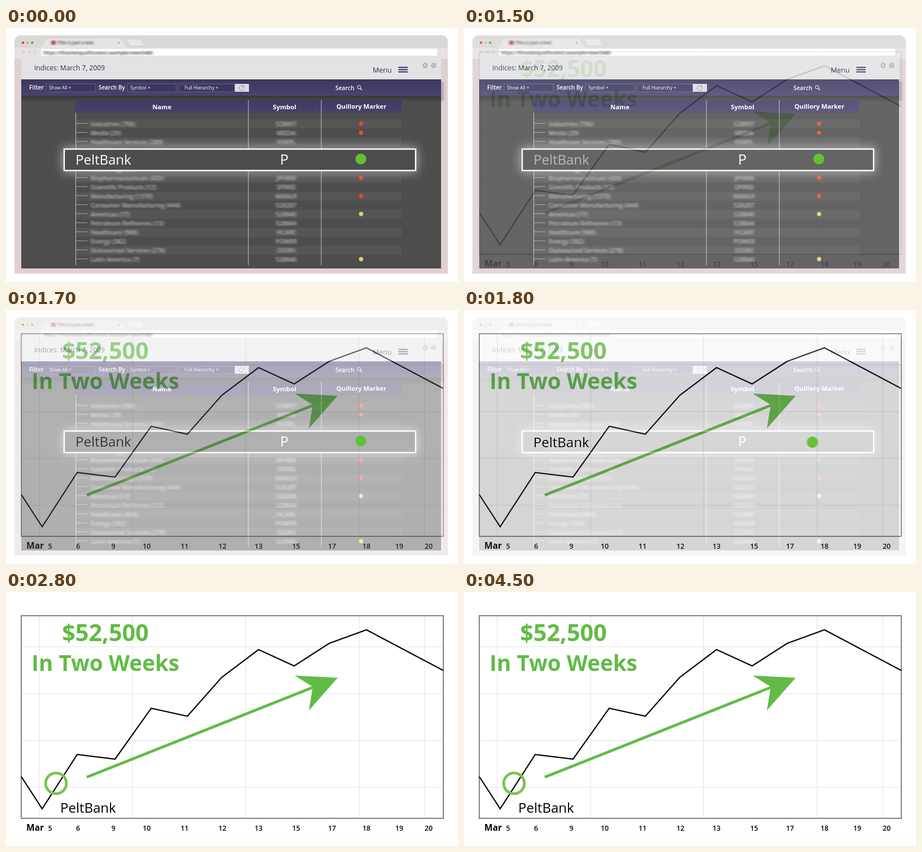
These frames come from a looping animation (800x450 px, 5100 ms). An HTML page:

```html
<!DOCTYPE html>
<html lang="en">
<head>
<meta charset="utf-8">
<title>Signal to chart</title>
<style>
html, body { margin: 0; width: 100%; height: 100%; overflow: hidden; background: #fff; }
svg { display: block; width: 100vw; height: 100vh; }
text { font-family: "Open Sans", "Noto Sans", sans-serif; }
</style>
</head>
<body>
<svg viewBox="0 0 800 450">
  <defs>
    <linearGradient id="bar" x2="0" y2="1">
      <stop offset="0" stop-color="#3b3762"/><stop offset="1" stop-color="#48446c"/>
    </linearGradient>
    <linearGradient id="head" x2="0" y2="1">
      <stop offset="0" stop-color="#3f3b66"/><stop offset="1" stop-color="#474269"/>
    </linearGradient>
    <linearGradient id="drop" x2="0" y2="1">
      <stop offset="0" stop-color="#000" stop-opacity=".28"/><stop offset="1" stop-color="#000" stop-opacity="0"/>
    </linearGradient>
    <filter id="smear" filterUnits="userSpaceOnUse" x="0" y="0" width="800" height="450">
      <feGaussianBlur stdDeviation="2 .9"/>
    </filter>
    <filter id="glow" filterUnits="userSpaceOnUse" x="0" y="0" width="800" height="450">
      <feGaussianBlur stdDeviation="9"/>
    </filter>
    <filter id="textBlur" filterUnits="userSpaceOnUse" x="0" y="0" width="800" height="450" color-interpolation-filters="sRGB">
      <feGaussianBlur stdDeviation="0"/>
    </filter>
    <filter id="dotBlur" filterUnits="userSpaceOnUse" x="0" y="0" width="800" height="450" color-interpolation-filters="sRGB">
      <feGaussianBlur stdDeviation="0"/>
    </filter>
    <clipPath id="frame"><rect x="15" y="13" width="767" height="422" rx="11"/><rect x="15" y="400" width="767" height="35"/></clipPath>
  </defs>
  <g id="chart"></g>
  <g id="browser" clip-path="url(#frame)"></g>
  <text id="label" font-size="24"></text>
  <circle id="dot"/>
</svg>
<script>
const LOOP = 5100, STEP = 100;
const BANK = "PeltBank", TICKER = "P", SIGNAL = "Quillory Marker";
const GREEN = "#62bb46";
const $ = id => document.getElementById(id);

function el(parent, tag, attrs, text) {
  const node = document.createElementNS("http://www.w3.org/2000/svg", tag);
  for (const key in attrs) node.setAttribute(key, attrs[key]);
  if (text) node.textContent = text;
  return parent.appendChild(node);
}
const rect = (g, x, y, width, height, fill, more) => el(g, "rect", { x, y, width, height, fill, ...more });
const path = (g, d, stroke, width = 1, more) =>
  el(g, "path", { d, stroke, "stroke-width": width, fill: "none", ...more });
const disc = (g, cx, cy, r, fill, more) => el(g, "circle", { cx, cy, r, fill, ...more });
const text = (g, str, x, y, size, fill, more) =>
  el(g, "text", { x, y, "font-size": size, fill, ...more }, str);
const mid = { "text-anchor": "middle" };
const semi = { "font-weight": 600 };
const bold = { "font-weight": 700 };

function drawChart(g) {
  for (const y of [97, 180, 263, 346]) path(g, `M27 ${y}H774`, "#ebebeb", 1.6);
  for (const x of [59, 224, 424, 625, 741]) path(g, `M${x} 42V401`, "#ebebeb", 1.6);
  rect(g, 27, 42, 747, 359, "none", { stroke: "#5a5a5a", "stroke-width": 1.5 });
  path(g, "M27 327L64 384L126 288L193 296L257 206L321 220L382 151L447 102L510 131L572 91L638 67L774 139", "#000", 2.2);
  path(g, "M143 328L548 167", GREEN, 5);
  el(g, "path", { d: "M587 152L511 148L543 168L536 210Z", fill: GREEN });
  text(g, "$52,500", 176, 87, 41.3, GREEN, { ...mid, ...bold });
  text(g, "In Two Weeks", 176, 140, 38.5, GREEN, { ...mid, ...bold });
  text(g, "Mar", 36, 423, 15.6, "#000", bold);
  const days = { 5: 78, 6: 127.5, 9: 190, 10: 249, 11: 316, 12: 383, 13: 447, 15: 513.5, 17: 577, 18: 638, 19: 696, 20: 748 };
  for (const day in days) text(g, day, days[day], 422.5, 12.4, "#000", { ...mid, ...semi });
}

function drawChrome(g) {
  rect(g, 15, 13, 767, 422, "#e0d0d0");
  rect(g, 15, 13, 767, 22, "#dad8d7");
  rect(g, 15, 35, 767, 20, "#e5e2e1");
  el(g, "path", { d: "M59 35Q64 34 67 27Q70 19 75 19H200Q205 19 208 27Q212 34 218 35Z", fill: "#e7e5e4" });
  el(g, "path", { d: "M213 20H236Q239 20 241 25Q243 31 246 31H223Q219 31 217 26Z", fill: "#e9e7e6" });
  ["#e0402f", "#e8b93a", "#4fb648"].forEach((c, i) => disc(g, 30 + i * 8.2, 26, 2.3, c));
  path(g, "M197.5 24L201 28M201 24L197.5 28", "#888", .8);
  path(g, "M34 43H28L31 40M28 43L31 46M38 43H44L41 40M44 43L41 46M54 40.5A3 3 0 1 0 55 44", "#c9c6c5", 1);
  rect(g, 62, 37, 701, 12, "#fff");
  for (const y of [40, 43, 46]) disc(g, 772, y, .8, "#fff");
  const soft = el(g, "g", { filter: "url(#smear)" });
  disc(soft, 84, 26, 4, "#a0483c");
  text(soft, "This is just a test", 91, 29, 8, "#4a4545", semi);
  text(soft, "https://thissiteisjustforatest.example/view/0480", 66, 46.5, 8.4, "#3c3838", semi);
}

function drawBars(g) {
  rect(g, 27, 54, 743, 38, "#e3e3e4");
  text(g, "Indices: March 7, 2009", 50, 75, 12.05, "#312d55");
  text(g, "Menu", 649, 78.5, 12.5, "#312d55");
  for (const y of [69.8, 73.8, 77.8]) path(g, `M694.5 ${y}H711`, "#332e62", 2);
  for (const x of [742, 757]) disc(g, x, 66.5, 3.8, "none", { stroke: "#77757c", "stroke-width": .9 });
  path(g, "M740.3 68L743.7 65M755.4 65L758.6 68.1M758.6 65L755.4 68.1", "#66646c", .9);

  rect(g, 766, 95, 9, 34, "#6a5a68", { opacity: .35, filter: "url(#smear)" });
  rect(g, 27, 120, 743, 306, "#4d4d4d");
  rect(g, 27, 120, 743, 12, "url(#drop)");
  rect(g, 27, 91, 743, 29, "url(#bar)");
  text(g, "Filter", 41, 109, 10.5, "#fff", semi);
  text(g, "Search By", 164, 109, 9.9, "#fff", semi);
  text(g, "Search", 583, 109.5, 10.3, "#fff", semi);
  for (const [x, w, tx, str] of [[71, 87, 76, "Show All +"], [215, 86, 220, "Symbol +"], [306, 99, 316, "Full Hierarchy +"]]) {
    rect(g, x, 99, w, 14, "#3b3761", { stroke: "#69658a", "stroke-width": .9 });
    text(g, str, tx, 109, 8.3, "#fff");
  }
  rect(g, 405, 99, 25, 14, "#dcdce2");
  path(g, "M420.6 104A4.3 4.3 0 1 0 421.3 107.4M421.3 101.5V104.5H418.3", "#8d8ba0", 1);
  disc(g, 624.8, 104.8, 3, "none", { stroke: "#fff", "stroke-width": 1 });
  path(g, "M627 107L630 110", "#fff", 1.2);
}

const rows = [
  ["Industries (706)", "528897"], ["Media (29)", "MEDIA"], ["Healthcare Services (289)", "HSRPL"],
  ["Multi-Retail Industries", ""], ["", ""], ["Technology (40)", ""],
  ["Biopharmaceuticals (420)", "JPHRM"], ["Scientific Products (12)", "SPRRD"], ["Manufacturing (1370)", "MANUF"],
  ["Consumer Manufacturing (444)", "526287"], ["Americas (17)", "528840"], ["Petroleum Refineries (13)", "528844"],
  ["Healthcare (988)", "HCARE"], ["Energy (382)", "POWER"], ["Outsourced Services (278)", "OSSRV"], ["Latin America (7)", "528846"]
];
const marks = { 0: "#df4a3a", 1: "#df4a3a", 6: "#df4a3a", 8: "#df4a3a", 10: "#e5d26a", 15: "#e5d26a" };

function drawTable(g) {
  rows.forEach((row, i) => { if (i % 2 === 0) rect(g, 123, 162 + 16 * i, 577, 16, "#555"); });
  rect(g, 123, 128, 577, 22.5, "url(#head)");
  text(g, "Name", 276, 144, 11.4, "#fff", { ...mid, ...bold });
  text(g, "Symbol", 493, 144, 11.3, "#fff", { ...mid, ...bold });
  text(g, SIGNAL, 629, 143, 11.2, "#fff", { ...mid, ...bold });
  path(g, "M123.5 150V420M429 128V420M558 128V420", "#c4c4c4", 1);
  const soft = el(g, "g", { filter: "url(#smear)" });
  rows.forEach(([name, symbol], i) => {
    const y = 170 + 16 * i;
    path(g, `M123 ${y - 1}H144`, "#a8a8a8", 1);
    text(soft, name, 150, y + 4, 10.6, "#bdbdbd", semi);
    text(soft, symbol, 496, y + 4, 10.6, "#bdbdbd", { ...mid, ...semi });
    if (marks[i]) {
      disc(g, 628.5, y - .5, 4.2, marks[i], { opacity: .45 });
      disc(g, 628.5, y - .5, 3.4, marks[i]);
    }
  });
  rect(g, 100, 211, 628, 45, "#fff", { opacity: .48, filter: "url(#glow)" });
  rect(g, 103, 214.5, 622, 38, "#4d4d4d", { stroke: "#fff", "stroke-width": 2.4 });
  text(g, BANK, 123, 242, 24, "#fff");
  text(g, TICKER, 492.5, 242, 25, "#fff", mid);
}

const unit = (t, a, b) => Math.min(1, Math.max(0, (t - a) / (b - a)));
const ease = u => u * u * (3 - 2 * u);
const speed = u => 6 * u * (1 - u);
const mix = (a, b, p) => a + (b - a) * p;

function set(node, attrs) {
  for (const key in attrs) node.setAttribute(key, attrs[key]);
}
function blur(node, id, x, y) {
  if (x + y === 0) return node.removeAttribute("filter");
  $(id).firstElementChild.setAttribute("stdDeviation", `${x} ${y}`);
  node.setAttribute("filter", `url(#${id})`);
}

function render(t) {
  const fade = ease(unit(t, 1350, 2000));
  set($("browser"), { opacity: 1 - fade, visibility: fade < 1 ? "visible" : "hidden" });

  const u = unit(t, 1760, 2700), p = ease(u);
  set($("label"), { x: mix(123, 96, p), y: mix(242, 391, p), opacity: ease(unit(t, 1300, 1850)) });
  blur($("label"), "textBlur", 0, .85 * speed(u));

  const v = unit(t, 1720, 2650), q = ease(v);
  const pulse = t < 1200 ? (1 - Math.cos(t / 600 * 2 * Math.PI)) / 2 : 0;
  set($("dot"), {
    cx: mix(628, 88.5, q), cy: mix(232, 339, q), r: mix(7.2, 18.3, Math.min(1, q * 1.25)),
    fill: "#62c035", "fill-opacity": 1 - q,
    stroke: q > .5 ? "#7cc24c" : "#62c035", "stroke-width": 4.8,
    opacity: 1 - .35 * pulse
  });
  blur($("dot"), "dotBlur", 2.8 * speed(v), .5 * speed(v));
}

drawChart($("chart"));
drawChrome($("browser"));
drawBars($("browser"));
drawTable($("browser"));
$("label").textContent = BANK;

const start = performance.now();
function tick() {
  const t = (performance.now() - start) % LOOP;
  render(Math.floor(t / STEP) * STEP);
  requestAnimationFrame(tick);
}
tick();
</script>
</body>
</html>
```
